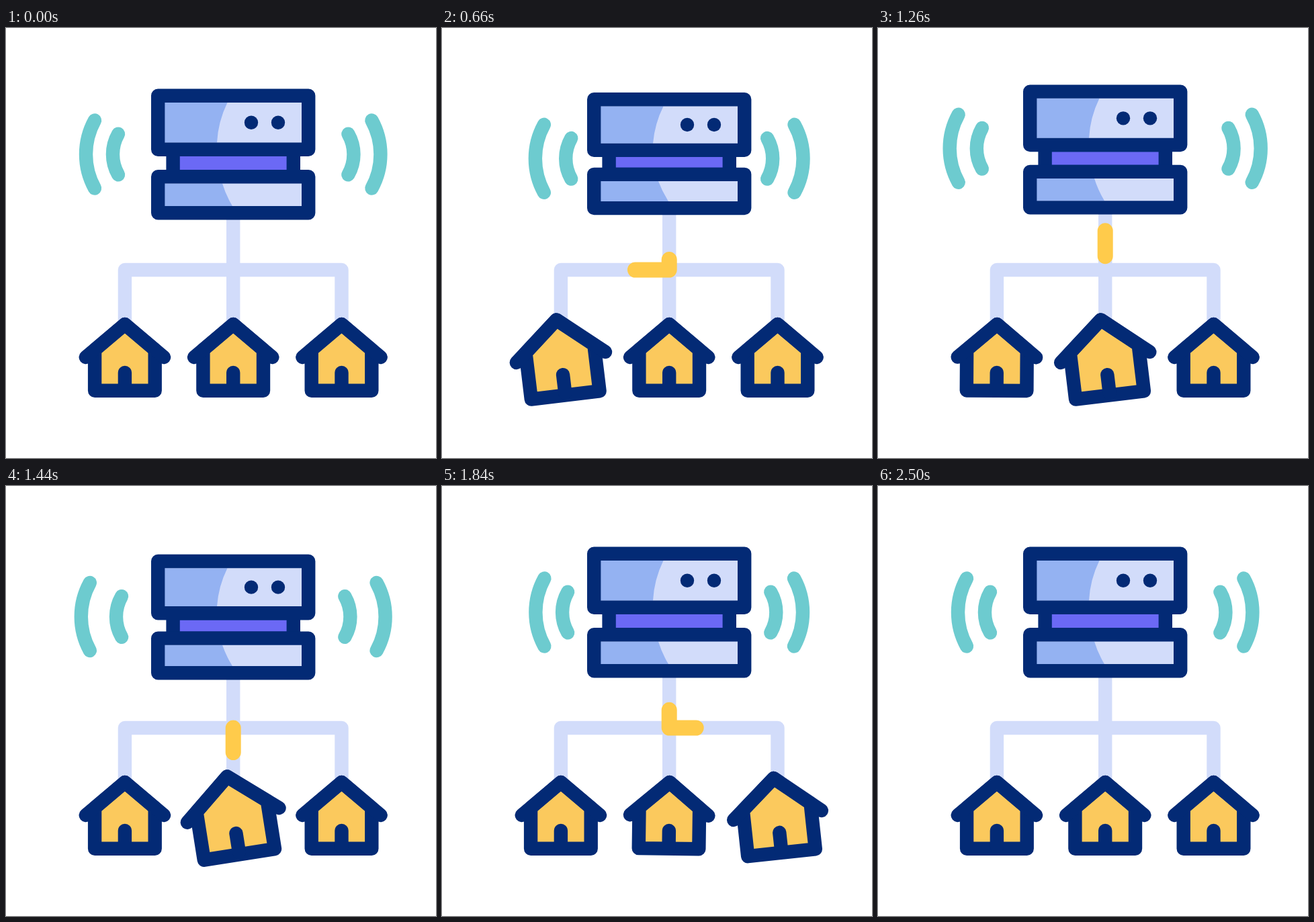
Recreate the animation shown at these times as an HTML page. Size 640 by 640 pixels, loop 3 s.

```html
<!DOCTYPE html>
<html lang="en">
<head>
<meta charset="utf-8">
<title>Network</title>
<style>
  html, body { margin: 0; width: 100%; height: 100%; overflow: hidden; background: #fff; }
  svg { display: block; width: 100vw; height: 100vh; }
  .line { fill: none; stroke-linecap: round; stroke-linejoin: round; stroke-width: 20.4; }
  .wire { stroke: #d2dcfa; }
  .pulse { stroke: #ffcb4b; stroke-width: 23; }
  .wave { stroke: #6dcbcf; }
  .navy { stroke: #032a75; }
  .house { fill: none; stroke: #032a75; stroke-linecap: round; stroke-linejoin: round; }
</style>
</head>
<body>
<svg id="stage" viewBox="0 0 640 640"></svg>
<script>
const LOOP = 3000, STEP = 20, BEAT = 600;
const MID = 338.2, GAP = 161.3, HALF = 10.2;
const stage = document.getElementById('stage');

function add(tag, attrs, parent = stage) {
  const el = document.createElementNS('http://www.w3.org/2000/svg', tag);
  set(el, attrs);
  parent.appendChild(el);
  return el;
}
function set(el, attrs) {
  for (const k in attrs) el.setAttribute(k, attrs[k]);
}

const clamp = v => Math.min(1, Math.max(0, v));
const ease = p => (1 - Math.cos(Math.PI * clamp(p))) / 2;

// Swings from rest at `from` through [time, value] extremes and back to rest at `to`
function swing(from, to, base, ...peaks) {
  const keys = [[from, base], ...peaks, [to, base]];
  return t => keys.slice(1).reduce((v, [t1, v1], i) => {
    const [t0, v0] = keys[i];
    return v + (v1 - v0) * ease((t - t0) / (t1 - t0));
  }, base);
}

// Server hop and squash
const hop = swing(220, 1830, 0, [500, 13], [900, -27], [1620, 13]);
const squash = swing(220, 1830, 0, [560, 8], [960, -3.2], [1560, 5]);

// Waves: shared lift, sideways travel per arc
const lift = swing(220, 1830, 0, [490, 15], [1010, -21], [1630, 14]);
const outerX = swing(220, 2365, 0, [800, 23], [1320, -13.5], [1750, 21.5]);
const innerX = swing(220, 2230, 0, [650, 25.3], [1215, -13], [1680, 25]);

// House wobble
const tilt = swing(410, 1300, 0, [800, -9.6], [1090, 4]);
const size = swing(410, 1240, 1, [790, 1.195]);

const left = MID - GAP, right = MID + GAP;
const spots = [left, MID, right];

// Wires and travelling pulses
add('path', { class: 'line wire', d: `M${left} 450V360H${right}V450M${MID} 230V450` });
const pulses = spots.map(x => ({
  el: add('path', { class: 'line pulse', d: `M${MID} 244.5V360H${x}V460.5` }),
  len: 216 + Math.abs(x - MID)
}));

// Signal waves, mirrored about the middle
const wave = (x, half, r, parent) => add('path', {
  class: 'line wave', d: `M${x} ${188 - half}a${r} ${r} 0 0 0 0 ${2 * half}`
}, parent);
const sides = ['', `translate(${2 * MID} 0) scale(-1 1)`].map(flip => {
  const g = add('g', {});
  return { g, flip, outer: wave(132, 50.5, 104.6, g), inner: wave(167, 30.3, 61, g) };
});

// Server
const neck = add('rect', { class: 'line navy', x: 248.6, width: 179.2, fill: '#6b69f5', style: 'fill:#6b69f5' });
const span = { x: MID - 112, width: 224 };
const boxes = [0, 1].map(() => ({
  base: add('rect', { ...span, fill: '#d2dcfa' }),
  shade: add('path', { fill: '#94b2f2' }),
  frame: add('rect', { ...span, class: 'line navy' })
}));
const dots = [365, 405].map(cx => add('circle', { cx, r: HALF, fill: '#032a75' }));

// Houses
const houses = spots.map(x => {
  const g = add('g', { class: 'house' });
  add('path', { d: 'M-44.8 -11L0 -49L44.8 -11V49.7H-44.8Z', fill: '#fbc95d' }, g);
  add('path', { d: 'M-58.2 0L0 -49L58.2 0M0 23V47' }, g);
  return { g, x };
});

function drawBox(box, top, bottom, x1, x2) {
  const rect = { y: top + HALF, height: bottom - top - 2 * HALF };
  set(box.base, rect);
  set(box.frame, rect);
  set(box.shade, {
    d: `M230 ${top + 2 * HALF}H${x1}A153.5 153.5 0 0 0 ${x2} ${bottom - 2 * HALF}H230Z`
  });
}

function drawServer(t) {
  const y = hop(t), s = squash(t);
  const top = 90.5 + y + s, waist = 191 + y + .3 * s;
  const hip = 211 + y - .4 * s, foot = 285.5 + y - s;
  drawBox(boxes[0], top, waist, 329.5, 314);
  drawBox(boxes[1], hip, foot, 322, 337);
  set(neck, { y: waist - HALF, height: hip - waist + 2 * HALF });
  dots.forEach(d => set(d, { cy: (top + waist) / 2 }));
}

function drawWaves(t) {
  for (const { g, flip, outer, inner } of sides) {
    set(g, { transform: `${flip} translate(0 ${lift(t)})` });
    set(outer, { transform: `translate(${outerX(t)} 0)` });
    set(inner, { transform: `translate(${innerX(t)} 0)` });
  }
}

function drawPulse({ el, len }, u) {
  const h = clamp((u - 340) / 695);
  const head = h - .02 * Math.sin(Math.PI * h);
  const tail = clamp((u - 483) / 667);
  const on = head > tail;
  el.style.display = on ? '' : 'none';
  if (on) set(el, {
    'stroke-dasharray': `${(head - tail) * len} 2000`,
    'stroke-dashoffset': -tail * len
  });
}

function drawHouse({ g, x }, u) {
  const s = size(u);
  set(g, {
    transform: `translate(${x} 490) rotate(${tilt(u)}) scale(${s})`,
    'stroke-width': 2 * HALF / s
  });
}

function draw(t) {
  drawServer(t);
  drawWaves(t);
  pulses.forEach((p, i) => drawPulse(p, t - i * BEAT));
  houses.forEach((h, i) => drawHouse(h, t - i * BEAT));
}

const start = performance.now();
function tick() {
  const t = (performance.now() - start) % LOOP;
  draw(Math.floor(t / STEP) * STEP);
  requestAnimationFrame(tick);
}
tick();
</script>
</body>
</html>
```
